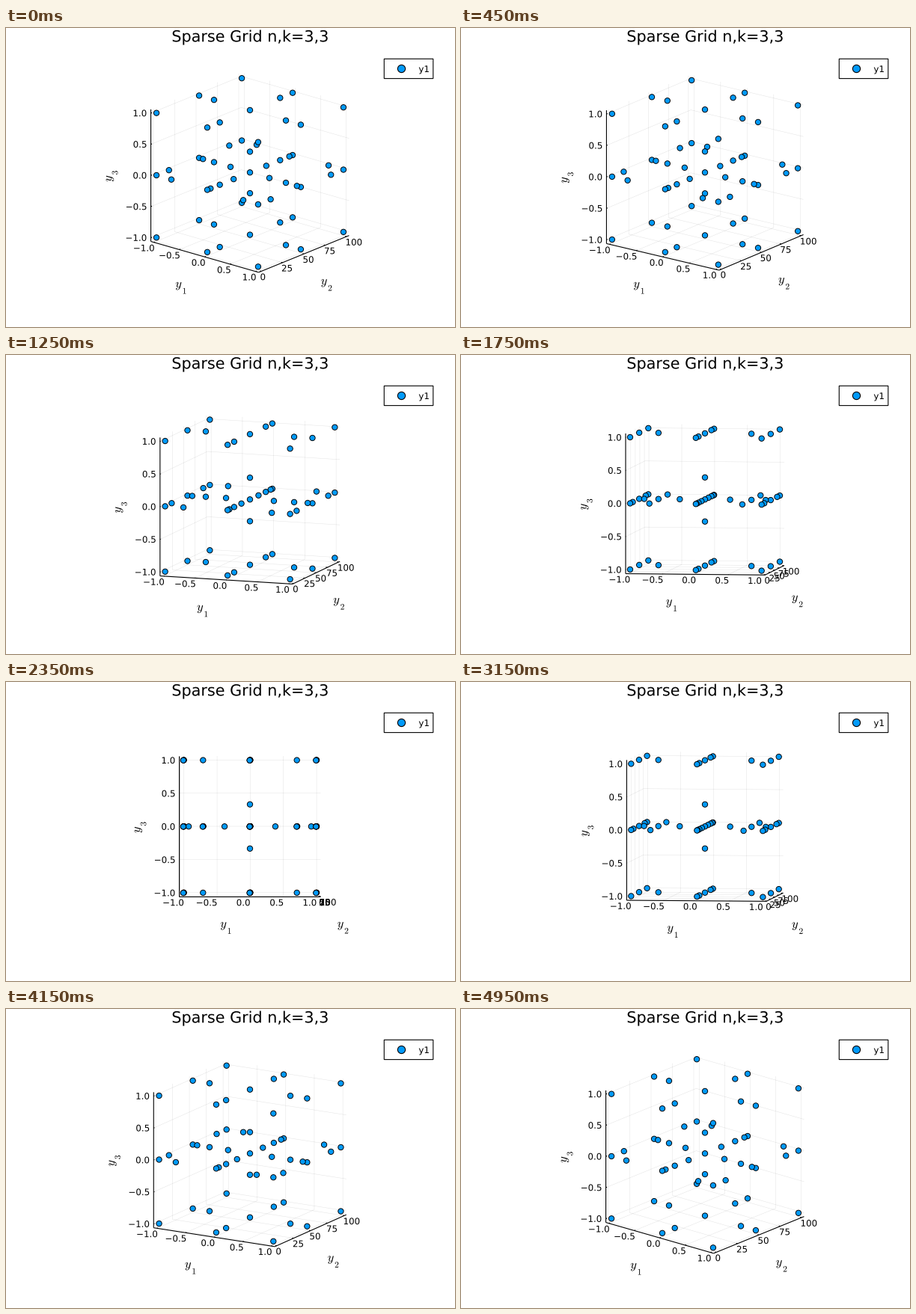
A matplotlib script for the animation above (5000 ms loop, 600 by 400 pixels).

```python
from itertools import product

import matplotlib.pyplot as plt
import numpy as np
from matplotlib.animation import FuncAnimation
from matplotlib.collections import LineCollection
from matplotlib.patches import PathPatch, Rectangle
from matplotlib.path import Path
from matplotlib.textpath import TextPath

W, H, DPI = 600, 400, 100
PT = 72 / DPI  # points per pixel
FRAMES, INTERVAL = 100, 50
CENTER = np.array([326.0, 193.25])
HALF = 94.0  # half edge of the cube in pixels
PAD = 1 / 1.06  # data range inside the cube
TICK = 0.024
BLUE = "#009afa"
LINE = 1.1
SMALL, LARGE, MATH = 11.86, 20.75, 16.4

fig = plt.figure(figsize=(W / DPI, H / DPI), dpi=DPI, facecolor="white")
ax = fig.add_axes([0, 0, 1, 1])
ax.set_xlim(0, W)
ax.set_ylim(H, 0)
ax.axis("off")


def sparse_grid(level):
    """Nested nodes per level, combined while the level sum stays in bounds."""
    r, a, b = np.cos(np.pi / 4), np.cos(np.pi / 8), np.cos(3 * np.pi / 8)
    cheb = [[0], [-1, 1], [-r, r], [-a, -b, b, a]]
    even = [[0], [-1, 1], [], [-1 / 3, 1 / 3]]
    points = []
    for i, j, k in product(range(level + 1), repeat=3):
        if i + j + k <= level:
            points += product(cheb[i], cheb[j], even[k])
    return np.array(sorted(points, key=lambda p: -p[1])) * PAD


def project(points, az, el):
    x, y, z = np.moveaxis(np.asarray(points, float), -1, 0)
    depth = y * np.cos(az) - x * np.sin(az)
    right = x * np.cos(az) + y * np.sin(az)
    up = z * np.cos(el) + depth * np.sin(el)
    return CENTER + HALF * np.stack([right, -up], axis=-1)


def glyphs(text, size):
    """Outline with y pointing down and the origin on the baseline."""
    prop = {"family": "DejaVu Sans", "math_fontfamily": "cm"}
    path = TextPath((0, 0), text, size=size, prop=prop)
    return Path(path.vertices * [1, -1], path.codes)


def ink(path):
    box = path.get_extents()
    return box.x0, box.x1


def shifted(path, dx, dy=0):
    return Path(path.vertices + [dx, dy], path.codes)


def math_label(sub):
    """Italic y with a low subscript, centred on the origin."""
    parts = []
    for text, size, x, y in (("$y$", MATH, -4, 0), (f"${sub}$", MATH * 0.7, 4, 8.3)):
        path = glyphs(text, size)
        parts.append(shifted(path, x - sum(ink(path)) / 2, y))
    return Path.make_compound_path(*parts)


class Label:
    """A text outline that follows a point of the cube."""

    def __init__(self, path, anchor, offset):
        self.path, self.anchor, self.offset = path, anchor, np.array(offset)
        self.patch = add_text(path)

    def place(self, az, el):
        pos = project(self.anchor, az, el) + self.offset
        self.patch.set_path(shifted(self.path, *pos))


def add_text(path):
    patch = PathPatch(path, fc="black", lw=0, zorder=3)
    patch.set_snap(False)
    return ax.add_patch(patch)


def add_lines(width, color, zorder):
    lines = LineCollection([], linewidths=width * PT, colors=[color], zorder=zorder)
    lines.set_snap(False)
    return ax.add_collection(lines)


def add_dots(points, diameter, stroke, zorder):
    # One size per dot keeps the positions off the pixel grid.
    sizes = np.full(len(points), (diameter * PT) ** 2)
    return ax.scatter(*np.transpose(points), s=sizes, c=BLUE, edgecolors="black",
                      linewidths=stroke * PT, zorder=zorder)


ticks = np.linspace(-PAD, PAD, 5)
decimals = ["\u22121.0", "\u22120.5", "0.0", "0.5", "1.0"]
hundreds = ["0", "25", "50", "75", "100"]

axis_segs = [[(-1, -1, -1), (1, -1, -1)],
             [(1, -1, -1), (1, 1, -1)],
             [(-1, -1, -1), (-1, -1, 1)]]
grid_segs = []
labels = [Label(math_label(1), (0, -1, -1), (-31, 41)),
          Label(math_label(2), (1, 0, -1), (31, 41))]
turned = math_label(3)
turned = Path(turned.vertices[:, ::-1] * [1, -1], turned.codes)
labels.append(Label(turned, (-1, -1, 0), (-52.6, 0.3)))

for t, dec, hun in zip(ticks, decimals, hundreds):
    axis_segs += [[(t, -1, -1), (t, -1 + TICK, -1)],
                  [(1, t, -1), (1 - TICK, t, -1)],
                  [(-1, -1, t), (-1, -1 + TICK, t)]]
    grid_segs += [[(t, -1, -1), (t, 1, -1)], [(t, 1, -1), (t, 1, 1)],
                  [(1, t, -1), (-1, t, -1)], [(-1, t, -1), (-1, t, 1)],
                  [(-1, -1, t), (-1, 1, t)], [(-1, 1, t), (1, 1, t)]]
    path = glyphs(dec, SMALL)
    right = ink(path)[1]
    labels += [Label(path, (t, -1, -1), (0.2 - right, 11.8)),
               Label(path, (-1, -1, t), (-6.1 - right, 4.3)),
               Label(glyphs(hun, SMALL), (1, t, -1), (-1.5, 11.7))]

grid = add_lines(0.55, (0, 0, 0, 0.1), 1)
axes_lines = add_lines(LINE, (0, 0, 0, 1), 2)
points = sparse_grid(3)
dots = add_dots(project(points, 0, 0), 7.3, 0.95, 4)

title = glyphs("Sparse Grid n,k=3,3", LARGE)
add_text(shifted(title, CENTER[0] + 0.2 - sum(ink(title)) / 2, 18.3))
ax.add_patch(Rectangle((505.3, 41.3), 65.5, 26.3, fc="white", ec="black",
                       lw=LINE * PT, zorder=5, snap=False))
add_dots([(528.0, 54.4)], 10.2, 1.1, 6)
entry = add_text(shifted(glyphs("y1", SMALL), 551.4, 59.0))
entry.set_zorder(6)


def draw(frame):
    swing = 1 + np.cos(2 * np.pi * frame / (FRAMES - 1))
    az, el = np.radians([20 * swing, 10 * swing])
    grid.set_segments(project(grid_segs, az, el))
    axes_lines.set_segments(project(axis_segs, az, el))
    dots.set_offsets(project(points, az, el))
    for label in labels:
        label.place(az, el)
    return []


anim = FuncAnimation(fig, draw, frames=FRAMES, interval=INTERVAL,
                     repeat=True, repeat_delay=0)
plt.show()
```
